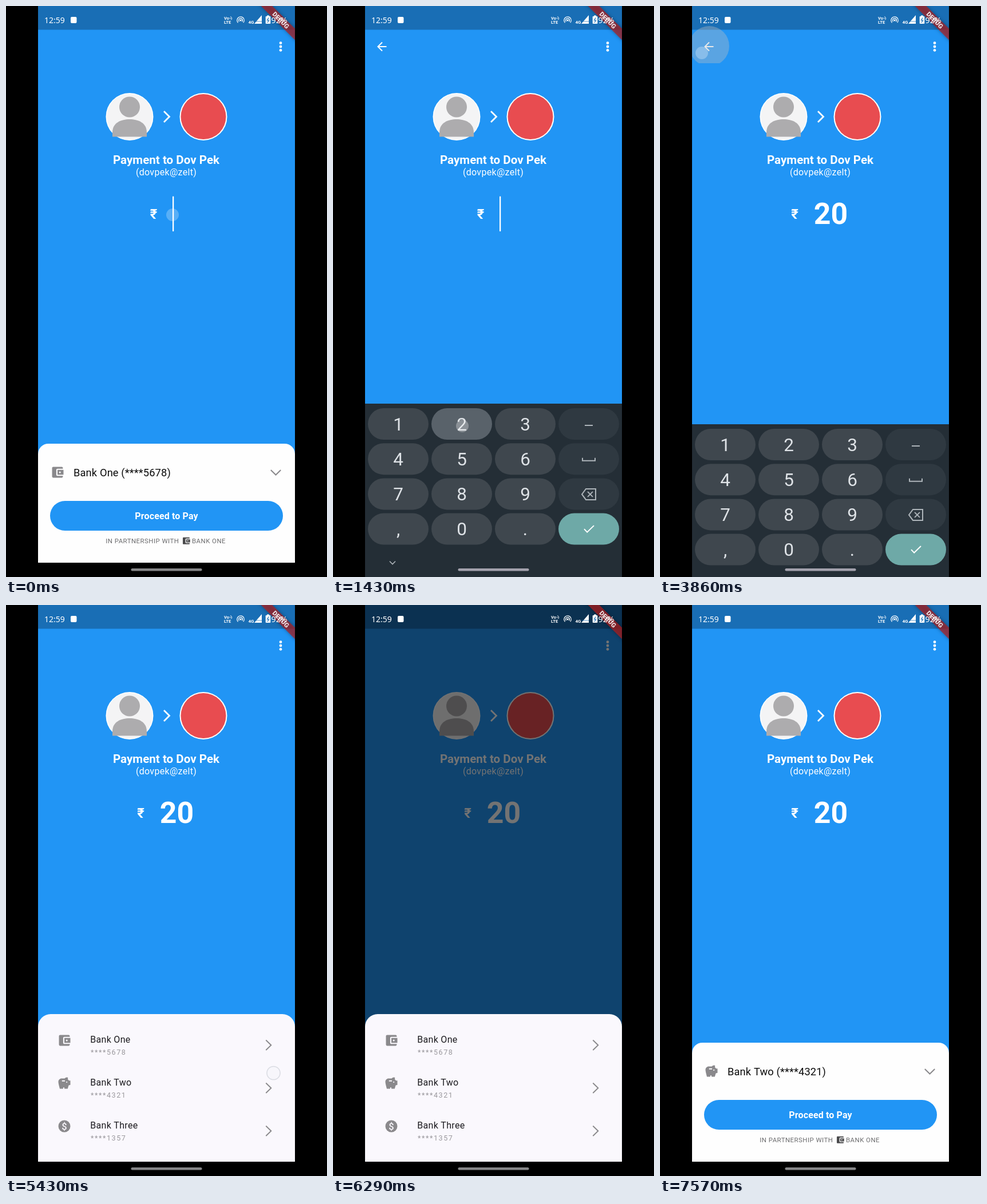
Write an HTML page with a canvas that moves like this. It is 561 px wide and 998 px high and loops after 8 s.

```html
<!DOCTYPE html>
<html lang="en">
<head>
<meta charset="utf-8">
<title>Payment screen</title>
<style>
html, body { margin: 0; width: 100%; height: 100%; overflow: hidden; background: #000; }
canvas { display: block; width: 561px; height: 998px; }
</style>
</head>
<body>
<canvas id="stage"></canvas>
<script>
const W = 561, H = 998, LOOP = 8000, FPS = 7;
const L = 56, R = 505, APP = R - L;
const BLUE = '#2195f5', GREY = '#8a898c';
const SANS = 'Roboto, sans-serif', NOTO = '"Noto Sans", sans-serif';

const canvas = document.getElementById('stage');
const c = canvas.getContext('2d');
const dpr = window.devicePixelRatio || 1;
canvas.width = W * dpr;
canvas.height = H * dpr;

const WALLET = new Path2D('M21 18v1c0 1.1-.9 2-2 2H5c-1.1 0-2-.9-2-2V5c0-1.1.9-2 2-2h14c1.1 0 2 .9 2 2v1h-9c-1.1 0-2 .9-2 2v8c0 1.1.9 2 2 2zM12 16h10V8H12zm4-2.5a1.5 1.5 0 1 1 0-3 1.5 1.5 0 0 1 0 3z');
const PIGGY = new Path2D('M19.8 7.5l-2.3-2.3c.1-.4.2-.8.4-1.1.5-1-.2-2.1-1.4-2.1-1.6 0-3.1.8-4 2h-5C4.5 4 2 6.5 2 9.5S4.5 21 4.5 21H10v-2h2v2h5.5l1.7-5.6 2.8-.9v-7zM13 9H8V7h5zm3 2a1 1 0 1 1 0-2 1 1 0 0 1 0 2z');
const BODY = new Path2D('M186 228.5V221C186 204 201 198 216 198S246 204 246 221V228.5Z');

const BANKS = [
  { name: 'Bank One', no: '****5678', icon: WALLET },
  { name: 'Bank Two', no: '****4321', icon: PIGGY },
  { name: 'Bank Three', no: '****1357' }
];

const clamp = x => Math.max(0, Math.min(1, x));
const ramp = (t, from, to) => clamp((t - from) / (to - from));
const smooth = x => x * x * (3 - 2 * x);
const easeOut = x => 1 - (1 - x) * (1 - x);

function rect(x, y, w, h, fill, r = 0) {
  c.fillStyle = fill;
  c.beginPath();
  c.roundRect(x, y, w, h, r);
  c.fill();
}

function disc(x, y, r, fill) {
  c.fillStyle = fill;
  c.beginPath();
  c.arc(x, y, r, 0, Math.PI * 2);
  c.fill();
}

function line(pts, color, width) {
  c.strokeStyle = color;
  c.lineWidth = width;
  c.beginPath();
  pts.forEach(([x, y]) => c.lineTo(x, y));
  c.stroke();
}

function text(s, x, y, size, color, o = {}) {
  c.font = `${o.weight || 400} ${size}px ${o.font || SANS}`;
  c.letterSpacing = (o.gap || 0) + 'px';
  c.textAlign = o.align || 'left';
  c.fillStyle = color;
  c.fillText(s, x, y);
}

function icon(path, x, y, scale, color) {
  c.save();
  c.translate(x - 12 * scale, y - 12 * scale);
  c.scale(scale, scale);
  c.fillStyle = color;
  c.fill(path, 'evenodd');
  c.restore();
}

function bankIcon(bank, x, y) {
  if (bank.icon) return icon(bank.icon, x, y, 1.05, GREY);
  disc(x, y, 10.5, GREY);
  text('$', x, y + 5.8, 16.5, '#faf8fd', { weight: 500, align: 'center' });
}

function header(back) {
  [64.7, 71, 77.3].forEach(y => disc(480, y, 2.4, '#fff'));
  if (back) {
    line([[93.5, 71], [79, 71]], '#fff', 2);
    line([[86, 63.5], [78.5, 71], [86, 78.5]], '#fff', 2);
  }
  disc(216, 193.5, 41.5, '#fff');
  disc(216, 193.5, 40, '#f4f4f5');
  disc(216, 176.5, 18, '#adacae');
  c.fill(BODY);
  line([[276, 184], [285.5, 193.5], [276, 203]], '#fff', 2.8);
  disc(345, 193.5, 41.5, '#fff');
  disc(345, 193.5, 39.5, '#e84c50');
  text('Payment to Dov Pek', 280, 276, 20.6, '#fff', { weight: 700, align: 'center' });
  text('(dovpek@zelt)', 280, 295.5, 16.03, '#fff', { gap: .29, align: 'center' });
}

function amount(value, cursor) {
  const field = Math.max(15, value.length * 29.8);
  const x = 299.5 - field / 2;
  text('₹', x - 34, 371.5, 24, '#fff', { weight: 700, align: 'center' });
  text(value, x - 1, 380.5, 51.8, '#fff', { weight: 700 });
  if (cursor) rect(x - 1 + value.length * 29.8, 332.5, 2.3, 61.5, '#fff', 1);
}

function card(bank) {
  rect(L, 765, APP, 208, '#fefefe', [18, 18, 0, 0]);
  bankIcon(bank, 90, 815);
  text(`${bank.name} (${bank.no})`, 118, 822, 18.32, '#0c0c0c', { gap: .12 });
  line([[462.8, 811], [471.5, 819.5], [480.2, 811]], GREY, 2);
  rect(77, 865, 407, 52, BLUE, 26);
  text('Proceed to Pay', 280.5, 896.5, 16.03, '#fff', { weight: 700, gap: .12, align: 'center' });
  text('IN PARTNERSHIP WITH', 174.3, 939, 11.45, '#6b6b6d', { gap: .46 });
  icon(WALLET, 315, 934.8, .668, '#4a4a4c');
  text('BANK ONE', 325, 939, 11.45, '#6b6b6d', { gap: .46 });
}

function sheet(dy) {
  c.save();
  c.beginPath();
  c.rect(L, 0, APP, 973);
  c.clip();
  c.translate(0, dy);
  rect(L, 715, APP, 258, '#faf8fd', [22, 22, 0, 0]);
  BANKS.forEach((b, i) => {
    const y = 761 + i * 75;
    bankIcon(b, 102, y);
    text(b.name, 147.3, y + 4, 16.03, '#1c1b1f', { gap: .29 });
    text(b.no, 148, y + 25, 12.6, '#9a989d', { gap: 1.55 });
    line([[454.3, y - .5], [463.3, y + 8.2], [454.3, y + 17]], GREY, 1.9);
  });
  c.restore();
}

function keyboard(dy, pressed) {
  const ink = '#dfe3e7', soft = '#aeb5ba';
  c.save();
  c.translate(0, dy);
  rect(L, 695, APP, 303, '#242e36');
  ['123–', '456_', '789<', ',0.='].forEach((row, j) => [...row].forEach((k, i) => {
    const x = 61 + i * 111, y = 703 + j * 61.2, mx = x + 53, my = y + 27.5;
    const fill = k === '=' ? '#6ea9a7' : i === 3 ? '#2f3941' : k === pressed ? '#59626a' : '#3f474e';
    rect(x, y, 106, 55, fill, 27.5);
    if (i < 3) text(k, mx, my + 11.3, 31.5, ink, { align: 'center' });
    else if (j === 0) line([[mx - 7, my + 2.5], [mx + 7, my + 2.5]], soft, 2);
    else if (j === 1) line([[mx - 11, my - 2], [mx - 11, my + 3], [mx + 11, my + 3], [mx + 11, my - 2]], soft, 2);
    else if (j === 2) {
      line([[mx + 12, my - 9], [mx - 5, my - 9], [mx - 12, my + .5], [mx - 5, my + 10], [mx + 12, my + 10], [mx + 12, my - 10]], soft, 2);
      line([[mx - 2, my - 4], [mx + 7, my + 5]], soft, 2);
      line([[mx + 7, my - 4], [mx - 2, my + 5]], soft, 2);
    } else line([[mx - 8, my], [mx - 2.8, my + 5.5], [mx + 9, my - 6]], '#fff', 2);
  }));
  line([[99, 970.5], [104, 975.5], [109, 970.5]], soft, 1.6);
  c.restore();
}

function statusIcons() {
  const w = '#fff';
  text('12:59', 67, 29.5, 14, w, { font: NOTO });
  rect(113, 19, 10.5, 11, w, 2);
  text('Vo', 381, 23.5, 7.5, w, { weight: 700 });
  text('LTE', 381, 31, 7.5, w, { weight: 700 });
  c.strokeStyle = w;
  c.lineWidth = 1;
  [2, 4.5].forEach(r => {
    c.beginPath();
    c.arc(390, 22, r, -1, .5);
    c.stroke();
  });
  c.lineWidth = 1.3;
  [3.4, 6.2].forEach(r => {
    c.beginPath();
    c.arc(410, 25, r, 2.4, 7);
    c.stroke();
  });
  disc(410, 25, 1.6, w);
  text('4G', 423.5, 31, 8, w, { weight: 700 });
  c.beginPath();
  c.moveTo(447, 16);
  c.lineTo(447, 31);
  c.lineTo(434, 31);
  c.fill();
  line([[434, 27], [447, 27]], '#196eb5', .7);
  rect(456, 16.5, 4, 2, w);
  rect(453.7, 18, 8.6, 13, w, 1);
  line([[459, 20.5], [456.5, 25], [459.5, 25], [457, 29]], '#196eb5', 1.2);
  text('92%', 463.5, 29.5, 14.3, w, { font: NOTO });
}

function banner() {
  c.save();
  c.translate(R, 0);
  c.rotate(Math.PI / 4);
  c.shadowColor = 'rgba(0,0,0,.5)';
  c.shadowBlur = 6 * dpr;
  rect(-46, 28, 92, 14, 'rgba(183,28,28,.68)');
  c.shadowColor = 'transparent';
  text('DEBUG', 0, 39, 11.3, 'rgba(255,255,255,.85)', { weight: 900, align: 'center' });
  c.restore();
}

function touch(x, y, alpha) {
  disc(x, y, 11, `rgba(255,255,255,${alpha})`);
}

function backRipple(alpha) {
  c.save();
  c.beginPath();
  c.rect(L, 0, APP, 100);
  c.clip();
  disc(86, 70, 35, `rgba(190,190,190,${alpha})`);
  c.restore();
}

function draw(n) {
  const t = n * 1000 / FPS;
  const closing = t > 3500;
  const open = closing ? 1 - smooth(ramp(t, 3740, 4285)) : easeOut(ramp(t, 60, 425));
  const typing = open > .001;
  const leave = ramp(t, 7240, 7520);
  const sheetUp = n >= 38 && leave < 1;
  const dim = .55 * ramp(t, 5429, 5714) * (1 - leave);
  const value = n < 11 ? '' : n < 14 ? '2' : '20';
  const cursor = n < 3 || (n >= 7 && n < 17) || (n >= 20 && n < 24);

  c.setTransform(dpr, 0, 0, dpr, 0, 0);
  rect(0, 0, W, H, '#000');
  c.save();
  c.beginPath();
  c.rect(L, 0, APP, H);
  c.clip();
  rect(L, 0, APP, typing ? H : 973, BLUE);
  rect(L, 0, APP, 41.5, '#196eb5');
  header(typing);
  amount(value, cursor);
  if (n < 2) touch(291, 365, n ? .1 : .25);
  if (!typing) card(BANKS[n >= 51 ? 1 : 0]);
  if (n >= 26 && n <= 28) backRipple([.2, .36, .15][n - 26]);
  if (n === 26 || n === 27) touch(73, 82, .28);

  if (dim) rect(L, 0, APP, 973, `rgba(0,0,0,${dim})`);
  if (sheetUp) sheet(258 * leave * leave);
  if (n === 38) {
    disc(467.5, 818, 12.3, '#d9dbe2');
    disc(467.5, 818, 10.8, '#f7f6fb');
  }

  const key = n === 10 || n === 11 ? '2' : n === 13 || n === 14 ? '0' : '';
  if (typing) keyboard(303 * (1 - open), key);
  if (key) touch(226, key === '2' ? 734 : 917, n % 3 === 1 ? .3 : .15);

  banner();
  statusIcons();
  rect(218.5, 983, 124, 4.5, typing ? '#a3a1ad' : '#868688', 2.2);
  c.restore();
}

function tick(now) {
  const t = now % LOOP;
  draw(Math.floor((t + 6) * FPS / 1000) % (LOOP * FPS / 1000));
  requestAnimationFrame(tick);
}
draw(0);
requestAnimationFrame(tick);
</script>
</body>
</html>
```
